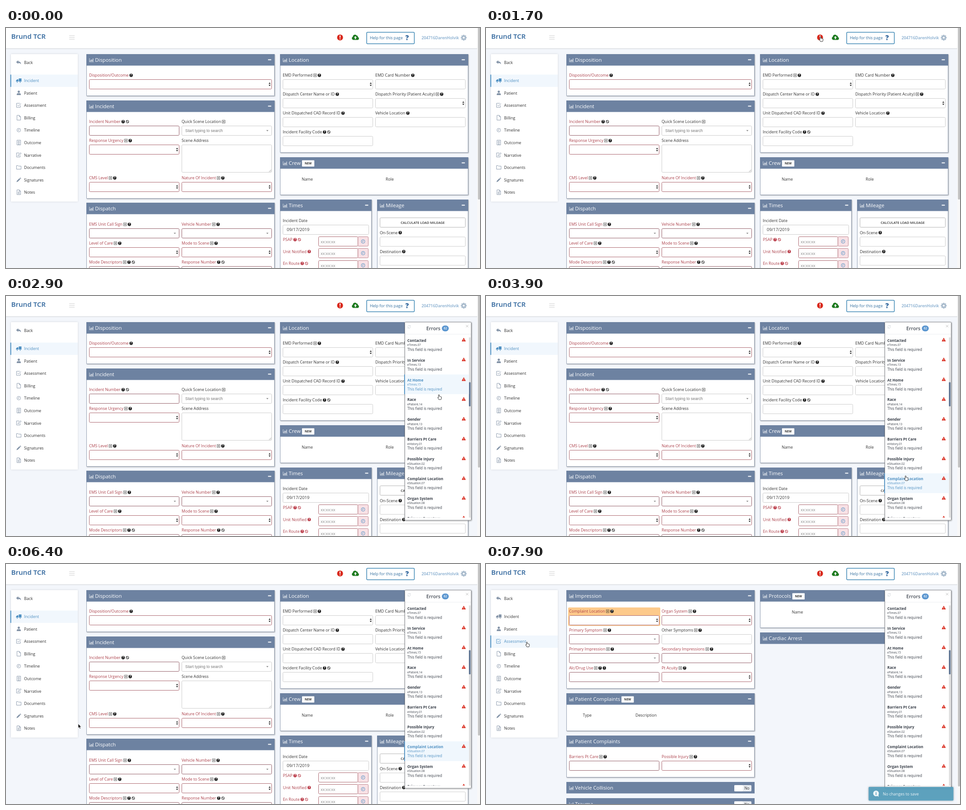
Write an HTML page with a canvas that moves like this. It is 1050 px wide and 533 px high and loops after 8000 ms.

```html
<!DOCTYPE html>
<html lang="en">
<head>
<meta charset="utf-8">
<title>Patient record form</title>
<style>
html, body { margin: 0; width: 100%; height: 100%; overflow: hidden; background: #f3f6fb; }
canvas { display: block; }
</style>
</head>
<body>
<canvas id="stage" width="1050" height="533"></canvas>
<script>
const c = document.getElementById('stage').getContext('2d');
const LOOP = 8000, PAGE_CHANGE = 6500;
const RED = '#ab3f49', INK = '#333', BLUE = '#4f90c2', SLATE = '#6d82a1', ALERT = '#d92a1c';

// ---- primitives ----
function text(s, x, y, { size = 8.82, weight = 400, color = INK, align = 'left', face = '"Open Sans"' } = {}) {
  c.font = `${weight} ${size}px ${face}, sans-serif`;
  c.textAlign = align;
  c.fillStyle = color;
  c.fillText(s, x, y + size * 0.36);
  return c.measureText(s).width;
}
function rect(x, y, w, h, fill, r = 0) {
  c.fillStyle = fill;
  c.beginPath(); c.roundRect(x, y, w, h, r); c.fill();
}
function box(x, y, w, h, border, fill = '#fff', r = 2, line = 1) {
  rect(x, y, w, h, fill, r);
  c.shadowColor = 'transparent';
  c.strokeStyle = border;
  c.lineWidth = line;
  c.beginPath(); c.roundRect(x + .5, y + .5, w - 1, h - 1, r); c.stroke();
}
function disc(x, y, r, fill) {
  c.fillStyle = fill;
  c.beginPath(); c.arc(x, y, r, 0, 7); c.fill();
}
function shape(d, x, y, { fill, stroke, line = 1 }) {
  const p = new Path2D(d);
  c.save();
  c.translate(x, y);
  c.lineJoin = 'round';
  if (fill) { c.fillStyle = fill; c.fill(p); }
  if (stroke) { c.strokeStyle = stroke; c.lineWidth = line; c.stroke(p); }
  c.restore();
}
function shadowed(blur, color, draw, offset = 0) {
  c.save();
  c.shadowBlur = blur;
  c.shadowColor = color;
  c.shadowOffsetX = c.shadowOffsetY = offset;
  draw();
  c.restore();
}
const ring = r => `M${-r} 0a${r} ${r} 0 1 0 ${2 * r} 0a${r} ${r} 0 1 0 ${-2 * r} 0`;
const CLOCK = ring(4) + 'M0-2.4V.6H-1.9';

// ---- form parts ----
function mark(kind, x, y, color) {
  if (kind === '+') shape('M-3.2-3.2H3.2V3.2H-3.2ZM-2 0H2M0-2V2', x, y, { stroke: color, line: .65 });
  else if (kind === '/') shape(ring(3) + 'M-2.1-2.1L2.1 2.1', x, y, { stroke: color, line: 1 });
  else {
    disc(x, y, 3.7, color);
    text(kind, x, y, { size: 6.6, weight: 700, color: '#fff', align: 'center' });
  }
}
function label(s, x, y, marks = '', color = INK, markColor = '#1c1c1c') {
  const end = x + text(s, x, y, { color });
  [...marks].forEach((m, i) => mark(m, end + 5.8 + i * 9.5, y, markColor));
}
// kind: '' input, 's' select, 'c' combo box
function field(x, y, s, marks, kind = '', required = false, w = 200, h = 22) {
  label(s, x, y, marks, required ? RED : INK);
  const top = y + 9, mid = top + 11;
  box(x, top, w, h, required ? (kind === 's' ? '#ac6870' : '#95606a') : '#cdcdcd');
  if (kind === 's') shape('M-2.3-1L0-4.2L2.3-1ZM-2.3 1L0 4.2L2.3 1Z', x + w - 5, mid, { fill: INK });
  if (kind === 'c') shape('M-2.5-1.2H2.5L0 1.6Z', x + w - 10, mid, { fill: '#888' });
}
function section(x, top, w, bottom, title, { add, toggle } = {}) {
  if (bottom) shadowed(2, '#0005', () => box(x, top, w, bottom - top, '#98a4b7', '#fff', 0), .5);
  rect(x, top, w, 25.5, SLATE);
  const y = top + 12.7;
  shape('M-4.6-4V4H5', x + 11.5, y + .5, { stroke: '#eef1f5', line: .8 });
  shape('M-2.8 3V1M-.8 3V-1.3M1.2 3V-.2M3.2 3V-3.2', x + 11.5, y + .3, { stroke: '#eef1f5', line: 1.2 });
  const end = x + 19.3 + text(title, x + 19.3, y, { size: 11.3, color: '#fff' });
  if (add) {
    rect(end + 3, top + 6.7, 27.3, 14, '#fff', 1);
    text('NEW', end + 16.6, top + 13.8, { size: 6.5, weight: 700, align: 'center' });
  }
  if (toggle) {
    rect(x + 372, top + 7, 38, 14, '#e9ecf0', 2);
    rect(x + 372, top + 7, 19, 14, '#fff', 2);
    text('No', x + 400, top + 14, { size: 8.2, align: 'center' });
  } else rect(x + w - 14.5, y - 1.2, 7, 2, '#fff');
}

// ---- pages ----
function incidentPage() {
  section(178, 58, 417, 151, 'Disposition');
  field(184, 105, 'Disposition/Outcome', '?', 's', true, 405);

  section(178, 161, 417, 379, 'Incident');
  field(184, 208, 'Incident Number', '?/', '', true);
  field(389, 208, 'Quick Scene Location', '+', 'c');
  text('Start typing to search', 397, 228, { color: '#777', face: '"Liberation Sans", Arial' });
  field(184, 250, 'Response Urgency', '+?', 's', true);
  field(389, 250, 'Scene Address', '', '', false, 200, 62);
  shape('M-5 0L0-5M-2.5 0L0-2.5', 587.5, 319.5, { stroke: '#888', line: .7 });
  field(184, 333, 'CMS Level', '+?', 's', true);
  field(389, 333, 'Nature Of Incident', '+?', 's', true);

  section(178, 388, 417, 560, 'Dispatch');
  field(184, 436, 'EMS Unit Call Sign', '+?', 'c', true);
  field(389, 436, 'Vehicle Number', '+?', 'c', true);
  field(184, 478, 'Level of Care', '+?', 's', true);
  field(389, 478, 'Mode to Scene', '+?', 's', true);
  field(184, 520, 'Mode Descriptors', '+?/', '', true);
  field(389, 520, 'Response Number', '?/', '', true);

  section(607, 58, 417, 277, 'Location');
  field(613, 105, 'EMD Performed', '+?', 's');
  field(818, 105, 'EMD Card Number', '?');
  field(613, 147, 'Dispatch Center Name or ID', '?');
  field(818, 147, 'Dispatch Priority (Patient Acuity)', '+?', 's');
  field(613, 189, 'Unit Dispatched CAD Record ID', '?');
  field(818, 189, 'Vehicle Location', '?');
  field(613, 231, 'Incident Facility Code', '?/');

  section(607, 287, 417, 371, 'Crew', { add: true });
  text('Name', 655, 336);
  text('Role', 841, 336);

  section(607, 381, 203, 560, 'Times');
  field(613, 428, 'Incident Date', '', '', false, 191);
  text('09/17/2019', 622, 448, { size: 9.45 });
  [['PSAP', '?/'], ['Unit Notified', '?'], ['En Route', '?/']].forEach(([s, marks], i) => {
    const y = 470 + i * 26.4, top = Math.round(y - 7);
    label(s, 613.5, y, marks, RED, '#b83643');
    box(779, top, 24, 22, '#c08a92', '#f8e1e5');
    box(692, top, 88, 22, '#ac6870');
    text('xx:xx:xx', 697, top + 11.5, { color: '#888' });
    shape(CLOCK, 791, top + 11, { stroke: '#4a8fc4', line: .9 });
  });

  section(822, 381, 202, 560, 'Mileage');
  box(828, 421, 190, 22, '#b5b5b5');
  text('CALCULATE LOAD MILEAGE', 923, 432.5, { size: 7.56, weight: 600, align: 'center' });
  field(828, 454.5, 'On-Scene', '?', '', false, 190);
  field(828, 496.5, 'Destination', '?', '', false, 190);
}
function assessmentPage() {
  section(178, 58, 417, 277, 'Impression');
  rect(182, 96.5, 204, 41, '#fdca8b', 2);
  field(184, 105, 'Complaint Location', '+?', 's', true);
  field(389, 105, 'Organ System', '+?', 's', true);
  field(184, 147, 'Primary Symptom', '+?', 'c', true);
  field(389, 147, 'Other Symptoms', '+?');
  field(184, 189, 'Primary Impression', '+?', 'c', true);
  field(389, 189, 'Secondary Impressions', '+?', '', true);
  field(184, 231, 'Alc/Drug Use', '+?!', '', true);
  field(389, 231, 'Pt Acuity', '+?', 's', true);

  section(178, 287, 417, 371, 'Patient Complaints', { add: true });
  text('Type', 214.5, 336);
  text('Description', 331, 336);
  section(178, 381, 417, 474, 'Patient Complaints');
  field(184, 428, 'Barriers Pt Care', '+?', '', true);
  field(389, 428, 'Possible Injury', '+?', 's', true);
  section(178, 484, 417, 0, 'Vehicle Collision', { toggle: true });
  section(178, 520, 417, 0, 'Trauma', { toggle: true });

  section(607, 58, 417, 142, 'Protocols', { add: true });
  text('Name', 677.5, 107);
  section(607, 152, 417, 0, 'Cardiac Arrest');
}

// ---- frame around the pages ----
function header() {
  shadowed(3, '#0004', () => rect(-5, -5, 1060, 50, '#fff'));
  text('Brund TCR', 11.5, 19, { size: 15.1, weight: 600, color: '#2f659c' });
  shape('M-6-4H6M-6 0H6M-6 4H6', 146, 21, { stroke: '#cfcfcf' });
  disc(740, 21, 6.6, ALERT);
  rect(739, 16.5, 2, 5.3, '#fff');
  rect(739, 23.2, 2, 2, '#fff');
  shape('M-5 6A3.8 3.8 0 0 1-5.6-1.2A4.6 4.6 0 0 1 2.8-3.8A3 3 0 0 1 5.5-.6A3.4 3.4 0 0 1 5 6Z', 774, 20.5, { fill: '#1d7a1f' });
  shape('M-3.2 1L0-2.6L3.2 1H1.2V4H-1.2V1Z', 774, 20.5, { fill: '#fff' });
  box(798.5, 9, 106.5, 26.5, '#3f88b5', '#fff', 2, 1.5);
  text('Help for this page', 806, 22.3, { color: '#336f9f' });
  text('?', 888.5, 21.5, { size: 15, weight: 800, color: '#2f659c', align: 'center' });
  text('204716DarenHolvik', 920.5, 22, { weight: 600, color: '#7fa8cc' });
  for (let i = 0; i < 4; i++) {
    c.save();
    c.translate(1014, 21.5);
    c.rotate(i * Math.PI / 4);
    rect(-1.5, -6.5, 3, 13, '#aabccd', .5);
    c.restore();
  }
  disc(1014, 21.5, 4.9, '#aabccd');
  disc(1014, 21.5, 2.1, '#fff');
}

const FILE = 'M-4-5.3H1L4-2.3V5.3H-4ZM1-5.3V-2.3H4';
const menu = [
  ['Back', 'M-6-1L-1-5V-2.6Q5-2.6 5 4.5Q3.5 .8-1 .8V3Z', true],
  ['Incident', 'M0-4.5H6V2.5H0ZM-1-2.5H-3.5L-6 0V2.5H-1ZM-4.8 3.5a1.4 1.4 0 1 0 2.8 0ZM1.8 3.5a1.4 1.4 0 1 0 2.8 0Z', true],
  ['Patient', 'M-2.5-2.5a2.5 2.5 0 1 0 5 0a2.5 2.5 0 1 0-5 0M-4.5 5V3Q-4 .6-2 .6H2Q4 .6 4.5 3V5Z', true],
  ['Assessment', 'M3.5 0V4.5H-5V-4.5H2.5M-3-.8L-.8 1.6L5-4'],
  ['Billing', FILE],
  ['Timeline', CLOCK],
  ['Outcome', 'M-4-5.3H4V5.3H-4ZM-2-3H2M-2-1H2M-2 1H2M-1 5V3H1V5'],
  ['Narrative', 'M3 1V4.5H-5V-4.5H1M-2 1.8L-1.5-.2L4-5L5.5-3.5L0 1.5Z'],
  ['Documents', 'M-5-4H-1.5L-.5-2.8H5V4H-5Z'],
  ['Signatures', 'M-5 5L-4.2 2L1.3-3.5L3.5-1.3L-2 4.2ZM2-4.2L3.2-5.2L5.2-3.2L4.2-2Z', true],
  ['Notes', FILE + 'M-2-.5H2M-2 1.4H2M-2 3.3H2'],
];
function sidebar(active) {
  shadowed(4, '#0002', () => rect(11, 58, 148, 327.5, '#fff', 1));
  menu.forEach(([name, icon, solid], i) => {
    const y = i ? 117 + (i - 1) * 27.58 : 77.3, on = name === active;
    if (on) {
      rect(9.5, y - 13.5, 149.5, 27.3, '#f1f7fd');
      rect(9.5, y - 13.5, 2, 27.3, BLUE);
    }
    const tint = on ? BLUE : '#8494a8';
    shape(icon, 28.3, y - .5, solid ? { fill: tint } : { stroke: tint, line: .9 });
    text(name, 40, y, { color: on ? BLUE : INK });
  });
}

const errors = [
  ['Contacted', 'eTimes.07'], ['In Service', 'eTimes.13'], ['At Home', 'eTimes.15'],
  ['Race', 'ePatient.14'], ['Gender', 'ePatient.13'], ['Barriers Pt Care', 'eHistory.01'],
  ['Possible Injury', 'eSituation.02'], ['Complaint Location', 'eSituation.07'],
  ['Organ System', 'eSituation.08'], ['Primary Symptom', 'eSituation.09'],
];
function errorPanel(hovered) {
  shadowed(3, '#0007', () => box(883, 57.5, 148, 441, '#85888d', '#fff', 2), .7);
  shape('M-3-.5A3 3 0 0 1 2.4-1.8M3 .5A3 3 0 0 1-2.4 1.8M2.8-3.2V-1.4H1M-2.8 3.2V1.4H-1', 893, 68.5, { stroke: '#c4c9cf', line: .8 });
  shape('M-2.5-2.5L2.5 2.5M2.5-2.5L-2.5 2.5', 1021.5, 67, { stroke: '#b5b5b5', line: .9 });
  text('Errors', 931, 71.7, { size: 10.7, weight: 600, color: '#444b55' });
  rect(965.5, 65.5, 15.3, 13, '#5b96d0', 6.5);
  text('62', 973.2, 72, { size: 6.6, weight: 600, color: '#fff', align: 'center' });
  rect(884, 84.5, 146, .7, '#e6e8eb');
  rect(1025.5, 92, 3.6, 400, '#dedede');
  rect(1025.5, 191.5, 3.6, 53.5, '#5d7391', 1);
  c.save();
  c.beginPath(); c.rect(880, 86, 145.5, 406.3); c.clip();
  errors.forEach(([title, code], i) => {
    const top = 86 + i * 43.93, on = i === hovered;
    if (on) {
      rect(883, top + .3, 143, 43.9, '#f0f7fd');
      rect(882, top + .3, 1.8, 43.9, BLUE);
    }
    const color = on ? BLUE : '#3a404a';
    text(title, 889, top + 12.7, { size: 8.19, weight: 700, color });
    text(code, 889, top + 22.7, { size: 6.3, color });
    text('This field is required', 889, top + 32.7, { size: 8.19, color });
    shape('M0-3.8L4 3.4H-4Z', 1014, top + 11, { fill: ALERT, stroke: ALERT, line: .8 });
    shape('M0-1.4V1.2M0 1.9V2.9', 1014, top + 11, { stroke: '#fff' });
  });
  c.restore();
}
function toast(alpha) {
  c.save();
  c.globalAlpha = alpha * .9;
  shadowed(4, '#0005', () => rect(847.5, 495, 188, 30.5, '#55a0bf', 2));
  disc(864, 509.5, 6.3, '#fff');
  shape('M2 4L5.5 8V3Z', 864, 509.5, { fill: '#fff' });
  text('i', 864, 509.5, { size: 9.5, weight: 800, color: '#55a0bf', align: 'center' });
  text('No changes to save', 879, 510.5, { color: '#fff' });
  c.restore();
}

// ---- pointer ----
const route = [
  [900, 800, -16], [1500, 741, 19], [1800, 741, 19], [2900, 959, 219], [3700, 929.5, 399],
  [4800, 929.5, 399], [5800, 160, 355], [7100, 160, 355], [7700, 90.5, 173],
];
function pointerAt(t) {
  const next = route.findIndex(p => p[0] > t);
  if (next < 1) return route[next ? route.length - 1 : 0].slice(1);
  const [t0, x0, y0] = route[next - 1], [t1, x1, y1] = route[next];
  const k = (t - t0) / (t1 - t0), e = k * k * (3 - 2 * k);
  return [x0 + (x1 - x0) * e, y0 + (y1 - y0) * e];
}
const inPanel = (x, y) => x > 883 && x < 1031 && y > 86 && y < 492;
function pointer(x, y, panelOpen) {
  const link = x < 159 || Math.hypot(x - 740, y - 21) < 7 || panelOpen && inPanel(x, y);
  if (link) shape('M-1 6V.8Q0-.8 1 .8V4Q2 3.2 2.7 4.3Q3.8 3.6 4.3 4.8Q5.5 4.4 5.6 6V8Q5.2 9.5 4.7 11H-.2Q-1.3 8.8-2.5 7Q-2.8 5.4-1 6.6Z', x, y, { fill: '#fff', stroke: '#222', line: .9 });
  else shape('M0 0V9.3L2.1 7.4L3.6 11L5.2 10.3L3.7 6.9H6.6Z', x, y, { fill: '#111', stroke: '#fff', line: .6 });
}

function draw(t) {
  const assessment = t >= PAGE_CHANGE, panelOpen = t >= 1800;
  rect(0, 0, 1050, 533, '#f3f6fb');
  if (assessment) assessmentPage(); else incidentPage();
  header();
  sidebar(assessment ? 'Assessment' : 'Incident');
  rect(1044, 0, 6, 533, '#f8f8f8');
  rect(1045.5, -4, 4.5, assessment ? 498 : 385, '#c2c2c2', 2);
  if (panelOpen) {
    // The hover trails the pointer and stays on the clicked row until the page changes.
    const [hx, hy] = pointerAt(Math.min(t - 100, 4700));
    errorPanel(!assessment && inPanel(hx, hy) ? Math.floor((hy - 86) / 43.93) : -1);
  }
  if (assessment) toast(Math.min(1, (t - PAGE_CHANGE) / 300));
  pointer(...pointerAt(t), panelOpen);
}
function tick() {
  draw(performance.now() % LOOP);
  requestAnimationFrame(tick);
}
tick();
</script>
</body>
</html>
```
